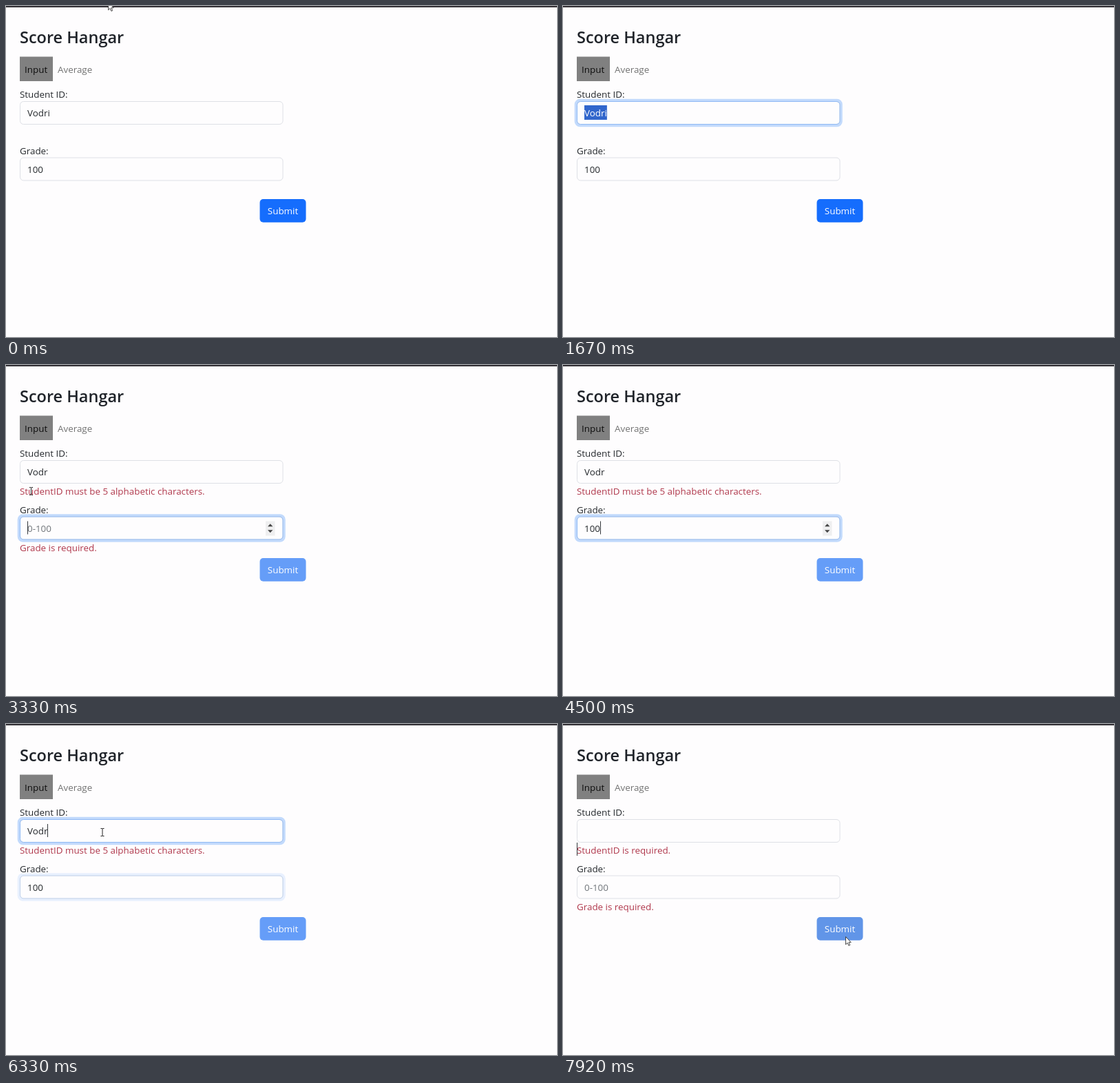
Animation of 800 by 480 pixels, one loop 8 s. Source, as an HTML page:

```html
<!DOCTYPE html>
<html lang="en">
<head>
<meta charset="utf-8">
<title>Score Hangar</title>
<style>
  html, body { margin: 0; width: 100%; height: 100%; overflow: hidden; background: #fefdfe; }
  svg { display: block; width: 800px; height: 480px; }
  text { font: 13.4px "Open Sans", "Noto Sans", sans-serif; fill: #24282c; white-space: pre; }
  .title { font-size: 23.5px; font-weight: 600; fill: #1f2329; }
  .error { fill: #b0384c; }
  .border { fill: #fefdfe; stroke: #dee0e6; }
  .ring { fill: #c2dafc; }
  .focus { fill: none; stroke: #8fb9f4; }
  .selection { fill: #3166cc; }
  .caret { stroke: #33373b; }
</style>
</head>
<body>
<svg viewBox="0 0 800 480">
  <rect width="800" height="480" fill="#fefdfe"/>
  <rect width="800" height="2" fill="#363338"/>
  <text class="title" x="20" y="54">Score Hangar</text>
  <rect x="20" y="73.5" width="48" height="35.5" fill="#808080"/>
  <text x="27" y="97" style="fill:#0c0c0c">Input</text>
  <text x="75" y="97" style="fill:#737373">Average</text>
  <g id="fields"></g>
  <g id="spinner">
    <rect x="377" y="226.5" width="13.5" height="21" fill="#efeff0"/>
    <path d="M380 234.3l3.7-4 3.7 4zM380 239.3l3.7 4 3.7-4z" fill="#454545"/>
  </g>
  <rect id="button" x="368.5" y="280" width="67" height="33.7" rx="5"/>
  <text x="402" y="302" text-anchor="middle" style="fill:#fff">Submit</text>
  <path id="pageCaret" class="caret" d="M20.5 172v19"/>
  <path id="arrow" d="M.5 .5v11.3l2.6-2.4 1.8 4 1.8-.8-1.8-3.9h3.3z" fill="#fff" stroke="#333" stroke-width=".9"/>
  <path id="beam" d="M-2.5-5.5H-.7L0-5 .7-5.5H2.5M0-5V5M-2.5 5.5H-.7L0 5 .7 5.5H2.5" fill="none" stroke="#222"/>
</svg>
<script>
const LOOP = 8000, STEP = 1000 / 12, BLINK = 530, FADE = 150;
const byId = id => document.getElementById(id);
const show = (el, on) => { el.style.visibility = on ? 'visible' : 'hidden'; };
const clamp = v => Math.max(0, Math.min(1, v));
const within = (t, spans) => spans.some(([from, to]) => t >= from && t < to);

// Last entry whose time has passed
const at = (t, list) => list.filter(e => e[0] <= t).pop();

function add(tag, cls, attrs) {
  const el = document.createElementNS('http://www.w3.org/2000/svg', tag);
  el.setAttribute('class', cls);
  for (const key in attrs) el.setAttribute(key, attrs[key]);
  byId('fields').append(el);
  return el;
}

function makeField(label, top, track) {
  const box = { x: 20.5, y: top + .5, width: 381.5, height: 33, rx: 5 };
  add('text', '', { x: 20, y: top - 5 }).textContent = label;
  const ring = add('rect', 'ring', { x: 16.7, y: top - 3.3, width: 389, height: 40.6, rx: 8 });
  add('rect', 'border', box);
  const focus = add('rect', 'focus', box);
  const selection = add('rect', 'selection', { x: 31, y: top + 6, height: 21 });
  const text = add('text', '', { x: 31, y: top + 22 });
  const caret = add('path', 'caret', {});
  const error = add('text', 'error', { x: 20, y: top + 50 });

  return t => {
    const [, value, message] = at(t, track.values);
    const span = track.focus.find(([from, to]) => t >= from && t < to + FADE);
    const glow = span ? clamp((t - span[0] + STEP) / FADE) * clamp(1 - (t - span[1]) / FADE) : 0;
    const selected = within(t, track.selected);
    ring.style.opacity = focus.style.opacity = glow;
    text.textContent = value || track.placeholder;
    text.style.fill = selected ? '#fff' : value ? '' : '#70757a';
    error.textContent = message;

    const width = value ? text.getComputedTextLength() : 0;
    selection.setAttribute('width', width);
    show(selection, selected);
    const blink = at(t, track.blink);
    const lit = blink && (t - blink[0]) % (2 * BLINK) < BLINK;
    caret.setAttribute('d', `M${Math.round(31 + width) + .5} ${top + 7}v19`);
    show(caret, lit && !selected && within(t, track.focus));
  };
}

const TOO_SHORT = 'StudentID must be 5 alphabetic characters.';
const NO_GRADE = 'Grade is required.';

const fields = [
  makeField('Student ID:', 138, {
    placeholder: '',
    values: [[0, 'Vodri', ''], [1900, 'Vodr', TOO_SHORT], [6800, 'Vodri', ''], [7740, '', 'StudentID is required.']],
    focus: [[1080, 2320], [6240, 7320]],
    selected: [[1240, 1820]],
    blink: [[1080], [1600], [6240], [6800]]
  }),
  makeField('Grade:', 219.5, {
    placeholder: '0-100',
    values: [[0, '100', ''], [2900, '', NO_GRADE], [3740, '1', ''], [3900, '10', ''], [4070, '100', ''], [7740, '', NO_GRADE]],
    focus: [[2320, 6240]],
    selected: [[2570, 2900]],
    blink: [[2320], [2900], [4070]]
  })
];

const BLUE = [21, 109, 253], HOVER = [14, 94, 220], PALE = [101, 157, 248], PALE_HOVER = [97, 149, 232];
const buttonTrack = [[-FADE, BLUE], [1900, PALE], [6800, BLUE], [7230, HOVER], [7740, PALE_HOVER]];

function buttonColor(t) {
  const i = buttonTrack.findLastIndex(e => e[0] <= t);
  const [start, to] = buttonTrack[i];
  const from = buttonTrack[Math.max(0, i - 1)][1];
  const k = clamp((t - start) / FADE);
  return `rgb(${to.map((v, c) => Math.round(from[c] + (v - from[c]) * k))})`;
}

// time, x, y, shape until the next stop
const pointer = [
  [0, 148, -6, 'arrow'], [160, 146, 8, 'arrow'], [660, 60, 142, 'beam'],
  [900, 48, 155, 'beam'], [1300, 48, 155, ''], [1900, 60, 190, 'beam'],
  [2160, 76.5, 233, 'beam'], [2400, 50, 238, 'beam'], [3000, 46, 236, 'beam'],
  [3320, 36.5, 183, 'beam'], [3700, 36.5, 183, ''], [5080, 60, 200, 'arrow'],
  [5700, 181, 217, 'arrow'], [5900, 181, 217, 'arrow'], [6080, 150, 160, 'beam'],
  [6240, 140, 157, 'beam'], [6800, 140, 157, 'beam'], [7080, 164.5, 171, 'beam'],
  [7120, 200, 188, 'arrow'], [7250, 452, 290, 'arrow'], [7410, 410, 308, 'arrow'],
  [7900, 410, 308, 'arrow'], [LOOP, 410, 308, 'arrow']
];

function drawPointer(t) {
  const i = pointer.findLastIndex(e => e[0] <= t);
  const [t0, x0, y0, shape] = pointer[i], [t1, x1, y1] = pointer[i + 1];
  const u = (t - t0) / (t1 - t0), k = u * u * (3 - 2 * u);
  for (const id of ['arrow', 'beam']) {
    show(byId(id), shape === id);
    byId(id).setAttribute('transform', `translate(${x0 + (x1 - x0) * k} ${y0 + (y1 - y0) * k})`);
  }
}

function render(now) {
  // 3.4 ms absorbs the rounding of a twelfth of a second to 10 ms
  const t = Math.floor((now % LOOP + 3.4) / STEP) % 96 * STEP;
  fields.forEach(draw => draw(t));
  show(byId('spinner'), within(t, [[2080, 6240]]));
  show(byId('pageCaret'), t >= 7830);
  byId('button').style.fill = buttonColor(t);
  drawPointer(t);
}

const start = performance.now();
function tick() {
  render(performance.now() - start);
  requestAnimationFrame(tick);
}
tick();
</script>
</body>
</html>
```
